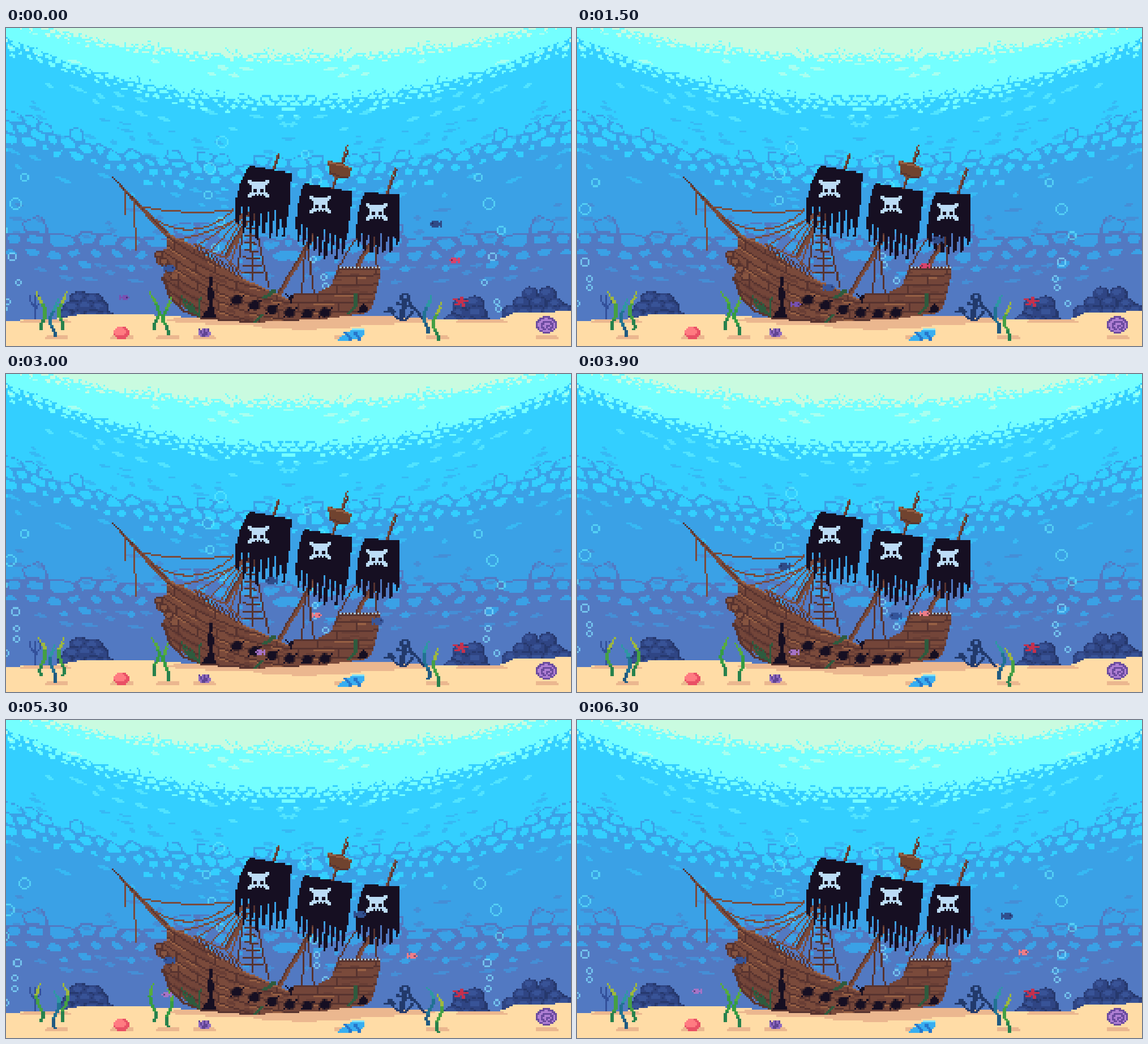
Animation, 998 px wide and 561 px high, one loop 6400 ms. Source, as an HTML page with a canvas:

```html
<!DOCTYPE html>
<html>
<head>
<meta charset="utf-8">
<style>
html, body { margin: 0; width: 100%; height: 100%; overflow: hidden; background: #33cfff; }
canvas { display: block; width: 998px; height: 561px; image-rendering: pixelated; }
</style>
</head>
<body>
<canvas id="view" width="320" height="180"></canvas>
<script>
// Shapes are given in stage pixels and rasterised on a 320 x 180 grid.
const W = 320, H = 180, K = 998 / W, LOOP = 6400, { sin, cos, abs, floor, round, min, max, exp, PI } = Math;
const view = document.getElementById('view').getContext('2d');
let g = view;

const hash = (a, b, s) => { const n = sin(a * 127.1 + b * 311.7 + s * 74.7) * 43758.5453; return n - floor(n); };
const mix = (a, b, k) => a + (b - a) * k;
const dot = (x, y, c) => { g.fillStyle = c; g.fillRect(x, y, 1, 1); };
const box = (x, y, w, h, c) => { g.fillStyle = c; g.fillRect(round(x / K), round(y / K), round(w / K), round(h / K)); };

// The colour may be a function of the grid cell.
function poly(p, c) {
  const ys = p.filter((_, i) => i % 2);
  for (let y = floor(min(...ys) / K); y <= max(...ys) / K; y++) {
    const cy = (y + .5) * K, cuts = [];
    for (let i = 0; i < p.length; i += 2) {
      const j = (i + 2) % p.length, y0 = p[i + 1], y1 = p[j + 1];
      if ((y0 <= cy) !== (y1 <= cy)) cuts.push(mix(p[i], p[j], (cy - y0) / (y1 - y0)) / K);
    }
    cuts.sort((a, b) => a - b);
    for (let i = 0; i + 1 < cuts.length; i += 2)
      for (let x = round(cuts[i]); x < round(cuts[i + 1]); x++) dot(x, y, c.call ? c(x, y) : c);
  }
}

function line(p, c, w = 1) {
  g.fillStyle = c;
  for (let i = 0; i + 3 < p.length; i += 2) {
    const dx = (p[i + 2] - p[i]) / K, dy = (p[i + 3] - p[i + 1]) / K, n = Math.ceil(max(abs(dx), abs(dy), 1));
    for (let k = 0; k <= n; k++)
      g.fillRect(floor(p[i] / K + dx * k / n - (w - 1) / 2), floor(p[i + 1] / K + dy * k / n), w, 1);
  }
}

function rope(x0, y0, x1, y1, sag, c) {
  const p = [];
  for (let t = 0; t <= 1; t += 1 / 16) p.push(mix(x0, x1, t), mix(y0, y1, t) + 4 * sag * t * (1 - t));
  line(p, c);
}

function disc(x, y, rx, ry, c) {
  const p = [];
  for (let a = 0; a < 2 * PI; a += .3) p.push(x + rx * cos(a), y + ry * sin(a));
  poly(p, c);
}

function layer(draw) {
  const cv = document.createElement('canvas');
  cv.width = W; cv.height = H;
  g = cv.getContext('2d');
  draw();
  g = view;
  return cv;
}

// ---- water: four arched borders, each breaking into rounded cells ----
const tones = ['#c9fbe0', '#74ffff', '#33cfff', '#3aa1e6', '#5279c2'];
const blends = ['#a8fff0', '#50e3ff', '#36b9f4', '#458ed6'];
const edges = [
  { mid: 17, bend: 21, sx: 5, sy: 2.5, h: 2.5 },
  { mid: 44, bend: 36, sx: 6, sy: 3.2, h: 4 },
  { mid: 84, bend: 26, sx: 9, sy: 6, h: 8 },
  { mid: 126, bend: 5, sx: 13, sy: 7.5, h: 9 }
];

function cell(x, y, sx, sy, seed) {
  const cx = floor(x / sx), cy = floor(y / sy);
  let near = 9, next = 9, row = 0;
  for (let j = cy - 1; j <= cy + 1; j++) for (let i = cx - 2; i <= cx + 2; i++) {
    const ox = i + .5 * (j & 1) + .7 * hash(i, j, seed), oy = j + .2 + .6 * hash(i, j, seed + 9);
    const d = Math.hypot(ox - x / sx, oy - y / sy);
    if (d < near) { next = near; near = d; row = (j + 1.4 * hash(i, j, seed + 5) - .2) * sy; }
    else if (d < next) next = d;
  }
  return { gap: next - near, row };
}

function streak(x, v, seed) {
  const j = floor(v / 4), sx = x + 13 * hash(j, 1, seed), i = floor(sx / 13);
  if (hash(i, j, seed) > .3) return false;
  const dx = sx - i * 13 - 6.5, dy = v - j * 4 - 2 + dx * .1;
  return abs(dx) / (2 + 4 * hash(i, j, seed + 2)) + abs(dy) / 1.4 < 1;
}

function waterTone(px, y) {
  const x = abs(px - 159.5), u = x / 160;
  let tone = tones[0];
  for (let i = 0; i < 4; i++) {
    const { mid, bend, sx, sy, h } = edges[i], v = y - mid + bend * u * u;
    const { gap, row } = cell(x, v, sx, sy, i * 20 + 3), t = (row + h) / (2 * h);
    if (t < 0 || (t < 1 && gap > .16 + .4 * t))
      return i > 1 && v > -h - 14 && v < -h * .5 && streak(x, v, i + 30) ? blends[i] : tone;
    tone = tones[i + 1];
    if (v > h && v < h + 12 && streak(x, v, i + 60)) tone = blends[i];
  }
  return tone;
}

const water = layer(() => {
  for (let y = 0; y < H; y++) for (let x = 0; x < W; x++) dot(x, y, waterTone(x, y));
});

// ---- wreck and sea floor ----
const wood = '#7a4a3b', dark = '#57332f', lit = '#976044', black = '#160f22', navy = '#223a6c';

function rocks(x0, x1, top) {
  const mid = (x0 + x1) / 2;
  for (let k = 0; k < 3; k++) {
    const half = (x1 - x0) / 2 * (.45 + .2 * k), n = round(half / 13);
    for (let i = 0; i < n; i++) {
      const r = 15 + 5 * hash(i, k, x0), x = mid + half * (2 * (i + .5) / n - 1), y = top + 15 + k * 16 + 5 * hash(k, i, x1);
      disc(x, y, r, r * .9, '#26386d');
      disc(x - r * .1, y - r * .15, r * .82, r * .66, '#2f4584');
      disc(x - r * .2, y - r * .35, r * .45, r * .28, '#385397');
    }
  }
}

function skull(x, y) {
  const c = '#bcdcf6';
  for (const s of [-15, 15]) for (const e of [-12, 12]) {
    box(x + s - 3, y + e - 3, 6.3, 6.3, c);
    box(x + s * .75 - 3, y + e * .75 - 3, 6.3, 6.3, c);
  }
  box(x - 9.4, y - 12.5, 19, 26, c);
  box(x - 12.5, y - 9.4, 25, 16, c);
  for (const d of [-8, 3]) box(x + d, y, 6.3, 6.3, black);
  for (const d of [-6, 0, 6]) box(x + d - 1, y + 10, 3.1, 3.1, black);
}

// Cloth hangs from a sloped yard and ends in tapering strips.
function sail({ x, y, w, drop, lean, pull, h, fringe, strips }) {
  for (let gy = floor(y / K); gy < H; gy++) for (let gx = floor((x - lean) / K); gx <= (x + w) / K; gx++) {
    const px = (gx + .5) * K, py = (gy + .5) * K, d0 = max(0, py - y);
    const left = x - lean * (1 - exp(-d0 / 35)), right = x + w - pull * d0 / 100;
    const u = (px - left) / (right - left), d = py - y - drop * u;
    if (u < 0 || u > 1 || d < 0) continue;
    const i = floor(u * strips), off = abs(u * strips - i - .5) * 2;
    const len = fringe * (.45 + .35 * sin(PI * u) + .35 * hash(i, strips, x));
    if (d < h || (d < h + len && off < max(.4, 1 - .7 * (d - h) / len))) dot(gx, gy, black);
  }
}

function plank(x, y) {
  const u = (x - 172) / 80, v = y + (u < 0 ? 27 : 5) * u * u;
  const row = floor(v / 5), seam = x + row * 11;
  if (v - row * 5 < 1 || seam % 23 === 0) return dark;
  if (v - row * 5 < 2 && hash(floor(x / 6), row, 3) > .8) return lit;
  if (hash(floor(x / 5), floor(v), 8) > .88) return '#693e35';
  return hash(floor(seam / 23), row, 2) > .5 ? wood : '#734539';
}

function seaFloor() {
  rocks(88, 197, 464);
  rocks(770, 864, 473);
  rocks(872, 1010, 455);
  for (let i = -1; i <= 1; i++) line([52, 514, 52, 498, 52 + i * 10, 486 - abs(i) * 5, 50 + i * 8, 474], '#33509a');
  poly([0, 517, 85, 514, 130, 506, 215, 504, 300, 509, 380, 517, 870, 515, 900, 502, 998, 500, 998, 561, 0, 561], '#ffdca6');
  const shade = '#ebb78f';
  disc(520, 516, 240, 9, shade);
  disc(530, 523, 100, 9, shade);
  for (const x of [70, 700, 840]) disc(x, 518, 48, 3.5, shade);
  for (const x of [90, 205, 286, 350, 600, 762, 955]) disc(x, 546, 22, 3.5, shade);
}

function rigging() {
  poly([185, 261, 190, 262, 300, 372, 284, 371, 232, 315], wood);
  line([190, 264, 235, 314, 290, 370], dark);
  line([211, 290, 211, 328], wood);
  line([226, 302, 229, 392], wood);
  rope(238, 315, 402, 321, 7, wood);
  rope(242, 322, 402, 322, 34, wood);
  rope(287, 375, 422, 330, 8, wood);
  for (let i = 0; i < 4; i++) line([342 + i * 18, 382 + i * 11, 420 + i * 2, 328], wood);
  for (const x of [-20, 8, 36]) line([428 + x / 4, 326, 428 + x, 440 + x / 2], dark);
  for (let i = 0; i < 8; i++) line([426 - i, 340 + i * 13, 434 + i * 2.8, 342 + i * 13], dark);
  for (const [x, y] of [[388, 404], [483, 470], [621, 420]]) {
    line([x, y, x + (y - 340) * .55, 345], wood, 3);
    line([x - 3, y, x - 3 + (y - 340) * .55, 345], dark);
  }
  for (const [x, y, h] of [[471, 250, 26], [576, 282, 74], [671, 294, 47]]) {
    line([x, y, x + h * .36, y - h], wood);
    line([x + 2, y, x + 2 + h * .36, y - h * .9], dark);
  }
  poly([567, 233, 594, 239, 611, 247, 606, 264, 590, 266, 572, 258], '#70432f');
  line([568, 236, 588, 241, 608, 248], lit);
  line([573, 255, 590, 262, 605, 262], dark);
  for (const x of [-8, 8]) line([531 + x / 4, 385, 533 + x * 1.3, 466], dark);
  line([618, 372, 589, 419], dark);
  line([650, 368, 655, 419], dark);
}

function hull() {
  const deck = [284, 362, 330, 385, 372, 416, 420, 444, 464, 464, 500, 480, 511, 468, 548, 468, 574, 456, 588, 420, 657, 420];
  poly([...deck, 662, 432, 648, 490, 638, 503, 560, 514, 445, 520, 340, 511, 297, 482, 278, 440, 281, 425, 266, 414, 263, 395, 285, 390], plank);
  line([278, 440, 290, 475, 314, 499, 345, 512, 440, 520], dark, 2);
  line(deck.slice(0, 12), lit);
  line([582, 441, 588, 426, 660, 426], dark);
  for (let x = 590; x < 660; x += 2 * K) box(x, 420, K, K, '#a9c4d4');
  for (let i = 0; i < 9; i++) {
    const x = 335 + i * 9, y = 383 + i * 5.4;
    line([x, y, x + 8, y + 16], dark);
  }
  line([332, 381, 385, 405, 418, 433], wood);
  for (let i = 0; i < 4; i++) {
    const x = 270 + i * 9, y = 400 + i * 13;
    disc(x, y, 9, 7, dark);
    disc(x, y - 1, 6, 4.5, '#865440');
  }

  poly([361, 436, 366, 441, 363, 458, 369, 470, 364, 482, 371, 510, 345, 511, 359, 490, 355, 470], black);
  poly([630, 487, 640, 493, 637, 502, 619, 503], black);
  poly([492, 466, 501, 473, 509, 469, 504, 487], black);
  for (let i = 0; i < 6; i++) {
    const x = 408 + i * 31.2, y = 480 + 24 * sin(PI * i / 8);
    disc(x, y, 11, 9, '#3d2528');
    disc(x, y, 8, 8, black);
    line([x - 10, y + 7, x + 10, y - 8], black);
  }
  const moss = '#2e5b3e';
  for (let i = 0; i < 3; i++) rope(328 + i * 7, 502 + i * 3, 310 + i * 8, 474 + i * 5, 4, moss);
  line([342, 510, 340, 485, 345, 475], moss);
  line([604, 503, 616, 492, 619, 470], moss, 2);
  line([458, 476, 474, 463], moss, 3);
  line([440, 518, 452, 508], moss, 2);
}

function seaFinds() {
  disc(705, 475, 10, 8, navy);
  disc(705, 475, 4, 4, '#5279c2');
  line([705, 482, 698, 512], navy, 3);
  line([691, 486, 717, 493], navy, 2);
  rope(678, 494, 718, 500, 18, navy);
  rope(678, 497, 718, 503, 16, navy);
  line([672, 502, 678, 493, 685, 501], navy, 2);
  line([708, 480, 722, 496, 738, 515], navy, 2);
  for (let i = 0; i < 5; i++) {
    const a = PI * (.4 * i - .45);
    line([803, 483, 803 + 12 * cos(a), 483 + 9 * sin(a)], '#c5304d', 2);
  }
  disc(204, 538, 14, 11, '#e95065');
  disc(201, 536, 10, 8, '#ff7b81');
  disc(350, 539, 11, 8, '#8f6ac0');
  for (const d of [-7, 0, 7]) line([350 + d, 533, 350 + d / 3, 545], '#604493');
  poly([583, 552, 613, 531, 632, 530, 633, 542, 620, 550], '#38aef0');
  for (const x of [600, 616]) line([x, 538, x + 9, 549], '#2776ca', 2);
  line([612, 533, 631, 532], '#82e4ff');
  for (let i = 0; i < 5; i++) disc(954 + i * .6, 524 + i * .6, 19 - i * 4, 15 - i * 3, i % 2 ? '#b07fd4' : '#6b4b9f');
}

const scene = layer(() => {
  seaFloor();
  rigging();
  hull();
  sail({ x: 432, y: 243, w: 74, drop: 13, lean: 31, pull: 8, h: 66, fringe: 55, strips: 8 });
  sail({ x: 527, y: 274, w: 88, drop: 15, lean: 17, pull: 13, h: 68, fringe: 56, strips: 9 });
  sail({ x: 635, y: 290, w: 62, drop: 4, lean: 20, pull: 0, h: 66, fringe: 36, strips: 7 });
  skull(446, 284);
  skull(555, 312);
  skull(655, 325);
  seaFinds();
});

// ---- bubbles: eight poses per cycle, one new bubble in each cycle ----
function ring(x, y, r) {
  const n = 2 * r + 1, cx = round(x / K - r), cy = round(y / K - r), cut = r > 2 ? 2 : 1, m = n - 2 * cut;
  g.fillStyle = y > 390 ? 'rgba(130,225,255,.7)' : 'rgba(100,238,255,.6)';
  for (const k of [0, n - 1]) {
    g.fillRect(cx + cut, cy + k, m, 1);
    g.fillRect(cx + k, cy + cut, 1, m);
  }
  if (cut > 1) for (const a of [1, n - 2]) for (const b of [1, n - 2]) g.fillRect(cx + a, cy + b, 1, 1);
}

const climb = s => 46.5 * (floor(s / 8) + (s % 8 / 8) ** 1.6);
const wave = (s, peak, period) => cos(2 * PI * (s - peak) / period);

function rise(pose, from, to, place) {
  for (let s = pose; s < to; s += 8) if (s >= from) place(s);
}

function bubbles(pose) {
  const columns = (x, y, r) => {
    ring(x, y, r);
    ring(866 - x, y, r);
    ring(x - 305, y - 41, r);
  };
  rise(pose, 0, 44, s => columns(864 - .35 * s + 17 * wave(s, 24, 30), 495 - climb(s), s < 9 ? 1.5 : s < 25 ? 2 : s < 38 ? 3 : 2));
  rise(pose, 5, 16, s => columns(867 - .28 * (s - 6) ** 2, 497 - 5.5 * (s - 5), 1.5));
  rise(pose, 8, 44, s => ring(365 + 14 * wave(s, 14, 26), 432 - climb(s), s < 30 ? 2 : 3));
}

// ---- seaweed ----
const teal = ['#2d98a3', '#217292', '#205b82'], leaf = ['#9eb83d', '#45a044', '#27824d'], stem = ['#57ac3b', '#359c43', '#27824d'];
const weeds = [[62, 531, 1, leaf], [86, 544, -1, teal], [101, 531, -1, leaf], [262, 531, 1, stem], [286, 541, -1, stem], [746, 537, -1, teal], [763, 549, -1, leaf]];

function weed([x, base, side, tones], t) {
  for (let y = 0; y < 68; y += K) {
    const h = y / 68, dx = 8 * side * min(1, 3 * h) * cos(4.7 * (h - .4) + t / 1600 * 2 * PI);
    box(x + dx - 3, base - y, h > .85 ? 3.1 : 6.2, 3.1, tones[h > .65 ? 0 : h > .25 ? 1 : 2]);
  }
}

// ---- fish: each swims out, turns, and comes home ----
const fishes = [
  { big: true, x: 759, y: 346, reach: -399, lift: -8, dip: 34, leave: 400, turn: 3950, home: 6000, span: 3950, go: '#2f4b87', back: '#30508f' },
  { big: true, x: 286, y: 424, reach: 404, lift: 4, dip: 32, leave: 400, turn: 3250, home: 5300, span: 3250, go: '#38569a', back: '#33549a' },
  { x: 788, y: 407, reach: -245, lift: 0, dip: 16, leave: 0, turn: 2900, home: 6300, span: LOOP, go: '#da426b', back: '#ed7d88' },
  { x: 208, y: 475, reach: 245, lift: 0, dip: 16, leave: 0, turn: 2900, home: 6300, span: LOOP, go: '#7751b2', back: '#a673c6' }
];

function fish(f, t) {
  const out = t < f.turn, q = max(0, (t - f.leave) / (f.turn - f.leave));
  const p = out ? (f.big ? q : sin(PI / 2 * q)) : max(0, (f.home - t) / (f.home - f.turn));
  const cx = round((f.x + f.reach * p) / K), cy = round((f.y + f.lift * p + f.dip * sin(PI * min(1, t / f.span))) / K);
  const right = out === f.reach > 0;
  const bit = (a, b, w, h) => g.fillRect(right ? cx + a : cx - a - w + 1, cy + b, w, h);
  g.fillStyle = out ? f.go : f.back;
  if (f.big) { bit(-1, -2, 4, 4); bit(-2, -1, 6, 2); bit(-3, -2, 1, 4); }
  else { bit(-1, -1, 3, 3); bit(-2, 0, 5, 1); bit(-3, -1, 1, 3); }
  g.fillStyle = 'rgba(25,20,60,.5)';
  bit(f.big ? 2 : 1, f.big ? -1 : 0, 1, 1);
}

function frame(now) {
  const step = floor(now / 100) % (LOOP / 100), t = step * 100;
  view.drawImage(water, 0, 0);
  bubbles(step % 8);
  view.drawImage(scene, 0, 0);
  weeds.forEach(w => weed(w, t));
  fishes.forEach(f => fish(f, t));
  requestAnimationFrame(frame);
}
requestAnimationFrame(frame);
</script>
</body>
</html>
```
